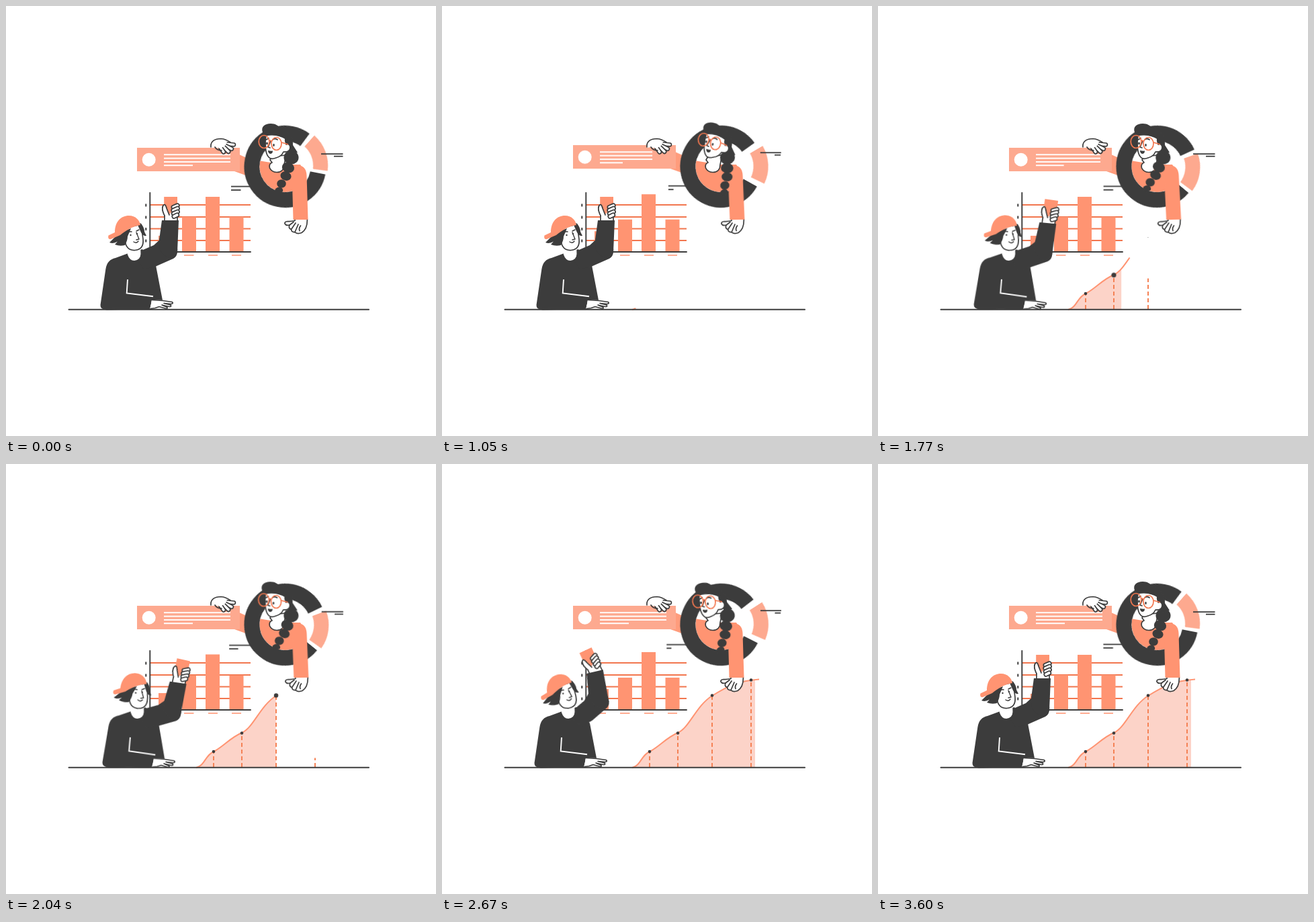
These frames come from a looping animation (640x640 px, 3.63 s). An HTML page without scripts:

```html
<!DOCTYPE html>
<html lang="en">
<head>
<meta charset="utf-8">
<title>Charts</title>
<style>
html, body { margin: 0; width: 100%; height: 100%; overflow: hidden; background: #fff; }
svg { display: block; width: 100vw; height: 100vh; --sine: cubic-bezier(.37,0,.63,1); }

.dark { fill: #3c3c3c; }
.orange { fill: #ff9472; }
.light { fill: #fda98f; }
.white { fill: #fff; }
.ink { fill: none; stroke: #3c3c3c; stroke-width: 1.7; stroke-linecap: round; stroke-linejoin: round; }
.skin { fill: #fff; stroke: #3c3c3c; stroke-width: 1.7; stroke-linejoin: round; stroke-linecap: round; }
.rim { fill: none; stroke: #f2764e; stroke-width: 1.7; }

/* Full-loop motion */
.loop { animation: 3630ms var(--sine) infinite; }
/* Half-second sways, two there-and-backs per loop */
.sway { animation: 907.5ms var(--sine) infinite alternate; }

.bar { transform-origin: 0 366px; animation-name: stretch; }
@keyframes stretch { to { transform: scaleY(var(--s)); } }

.spin { transform-origin: 415.5px 239px; animation: spin 1815ms var(--sine) infinite alternate; }
@keyframes spin { to { transform: rotate(29deg); } }
.slice { animation-name: slice; }
@keyframes slice { from { transform: translate(3.7px,-1.4px); } to { transform: translate(9.8px,-3.7px); } }

.noteR { animation-name: noteR; }
@keyframes noteR { to { transform: translate(5px,-2px); } }
.noteL { animation-name: noteL; animation-delay: -453.75ms; }
@keyframes noteL { from { transform: translate(4px,-1.7px); } to { transform: translate(-4px,1.7px); } }
.trim { animation-name: trim; transform-origin: var(--x) 0; }
@keyframes trim { to { transform: scaleX(var(--s)); } }

.banner { animation-name: banner; }
@keyframes banner { 27% { transform: translateY(-4px); } 48%, 100% { transform: none; } }
.words rect { transform-origin: 235px 0; animation-name: words; }
@keyframes words {
  0%, 53%, 100% { transform: none; }
  13.2% { transform: scaleX(.95); animation-timing-function: linear; }
  30% { transform: scaleX(.78); }
  48% { transform: scaleX(.97); }
}

.herHead { transform-origin: 409px 238px; animation-name: herHead; }
@keyframes herHead {
  0% { transform: none; animation-timing-function: cubic-bezier(.2,.5,.6,1); }
  30% { transform: rotate(8deg); }
  49.5% { transform: rotate(0deg); }
  77% { transform: rotate(-5.5deg); }
  100% { transform: none; }
}
.braid { transform-origin: 425px 224px; animation-name: braid; }
@keyframes braid {
  0%, 100% { transform: none; }
  30% { transform: rotate(-15deg); }
  49.5% { transform: rotate(7deg); }
  77% { transform: rotate(-10deg); }
}
.herArm { transform-origin: 436px 245px; animation-name: herArm; }
@keyframes herArm { 0%, 64%, 100% { transform: none; } 29% { transform: rotate(-.7deg); } 48.8% { transform: rotate(-1.3deg); } }

.body { transform-origin: 190px 452px; animation-name: body; }
@keyframes body {
  0%, 31%, 89%, 100% { transform: none; }
  48.8% { transform: translateX(2px) rotate(1.2deg); animation-timing-function: ease-out; }
  63% { transform: translateX(3.2px) rotate(1.3deg); }
  74% { transform: translateX(-3px); }
}
.hisHead { transform-origin: 190px 362px; animation-name: hisHead; }
@keyframes hisHead {
  0%, 31%, 89%, 100% { transform: none; }
  48.8% { transform: rotate(3.5deg); animation-timing-function: ease-out; }
  63% { transform: rotate(7deg); }
  74% { transform: rotate(-6.5deg); }
}
.upper { transform-origin: 205px 372px; animation-name: upper; }
@keyframes upper {
  0%, 31%, 89%, 100% { transform: none; }
  48.8% { transform: rotate(4deg); animation-timing-function: ease-out; }
  63% { transform: rotate(8deg); }
  74% { transform: rotate(-17deg); }
}
.fore { transform-origin: 243px 364px; animation-name: fore; }
@keyframes fore {
  0%, 31%, 63%, 89%, 100% { transform: none; }
  74% { transform: rotate(4deg); }
}
.grip { transform-origin: 245px 318px; animation-name: grip; }
@keyframes grip {
  0%, 31%, 89%, 100% { transform: none; }
  48.8% { transform: rotate(3deg); animation-timing-function: ease-out; }
  63% { transform: rotate(5deg); }
  74% { transform: rotate(-12deg); }
}
.tap { transform-origin: 217px 447px; animation-name: tap; }
@keyframes tap { 0%, 27%, 100% { transform: none; } 13.2% { transform: rotate(-7deg); } }

/* Area chart reveal, cut back to empty when the loop restarts */
.reveal { animation: 3630ms linear infinite; }
.curve { stroke-dasharray: 100 200; animation-name: curve; }
@keyframes curve { 0%, 28% { stroke-dashoffset: 100; } 68.5%, 100% { stroke-dashoffset: 0; } }
.wipe { transform-origin: 283px 0; animation-name: wipe; }
@keyframes wipe { 0%, 33.9% { transform: scaleX(0); } 68.3%, 100% { transform: none; } }
.rise { transform-origin: 0 452px; }
@keyframes rise1 { 0%, 31% { transform: scaleY(0); } 41%, 100% { transform: none; } }
@keyframes rise2 { 0%, 36% { transform: scaleY(0); } 46%, 100% { transform: none; } }
@keyframes rise3 { 0%, 44% { transform: scaleY(0); } 55%, 100% { transform: none; } }
@keyframes rise4 { 0%, 55% { transform: scaleY(0); } 66%, 100% { transform: none; } }
.dot { transform-box: fill-box; transform-origin: center; }
@keyframes dot1 { 0%, 34% { transform: scale(0); } 40% { transform: scale(1.6); } 46%, 100% { transform: none; } }
@keyframes dot2 { 0%, 42.5% { transform: scale(0); } 48.8% { transform: scale(1.55); } 54%, 100% { transform: none; } }
@keyframes dot3 { 0%, 48% { transform: scale(0); } 54% { transform: scale(1.6); } 60%, 100% { transform: none; } }
@keyframes dot4 { 0%, 62.8% { transform: scale(0); } 68% { transform: scale(1.6); } 73%, 100% { transform: none; } }
</style>
</head>
<body>
<svg viewBox="0 0 640 640">
  <defs>
    <path id="trend" pathLength="100" d="M283 452C296 449 296 434 309 428S334 407 351 400S378 360 402 345S440 323 472 320.5"/>
    <clipPath id="wipe"><rect class="reveal wipe" x="283" y="300" width="183" height="152"/></clipPath>
    <clipPath id="rise">
      <rect class="reveal rise" style="animation-name:rise1" x="306" y="428" width="6" height="24"/>
      <rect class="reveal rise" style="animation-name:rise2" x="348" y="400" width="6" height="52"/>
      <rect class="reveal rise" style="animation-name:rise3" x="399" y="345" width="6" height="107"/>
      <rect class="reveal rise" style="animation-name:rise4" x="457" y="321" width="6" height="131"/>
    </clipPath>
    <clipPath id="hole"><circle cx="415.5" cy="239" r="38"/></clipPath>
  </defs>

  <!-- Area chart -->
  <path d="M283 452C296 449 296 434 309 428S334 407 351 400S378 360 402 345S440 323 472 320.5V452Z" fill="#fcd3c8" clip-path="url(#wipe)"/>
  <path d="M309 451V428M351 451V400M402 451V345M460 451V321" fill="none" stroke="#f58255" stroke-width="2" stroke-dasharray="6 4" clip-path="url(#rise)"/>
  <use href="#trend" class="reveal curve" fill="none" stroke="#ff9472" stroke-width="2"/>
  <g class="dark">
    <circle class="reveal dot" style="animation-name:dot1" cx="309" cy="428" r="2.3"/>
    <circle class="reveal dot" style="animation-name:dot2" cx="351" cy="400.5" r="2.3"/>
    <circle class="reveal dot" style="animation-name:dot3" cx="402" cy="344.5" r="2.3"/>
    <circle class="reveal dot" style="animation-name:dot4" cx="460" cy="321.5" r="2.3"/>
  </g>

  <!-- Bar chart -->
  <path d="M214 296H364M214 314H364M214 331.5H364M214 349H364" fill="none" stroke="#f2764e" stroke-width="1.8"/>
  <path d="M230 371H244M265 371H279.5M301 371H315M336 371H350" fill="none" stroke="#ff9472" stroke-width="1.5"/>
  <g class="orange">
    <rect class="sway bar" style="--s:1.3" x="227" y="342" width="21" height="24"/>
    <rect class="sway bar" style="--s:.923" x="262" y="314" width="21" height="52"/>
    <rect class="sway bar" style="--s:1.049" x="297" y="284" width="21" height="82"/>
    <rect class="sway bar" style="--s:.923" x="332.5" y="314" width="21" height="52"/>
  </g>
  <path class="ink" style="stroke-width:1.9" d="M214.3 278V366H364"/>
  <path class="ink" style="stroke-width:2;stroke-linecap:butt" d="M208.3 294.5v4M208.3 312.5v4M208.3 330v4M208.3 347.5v4"/>

  <!-- Banner -->
  <g class="loop banner">
    <path class="orange" d="M340 221H347L358 226V252.5L340 246Z" opacity=".93"/>
    <rect class="light" x="195" y="211" width="153" height="35"/>
    <circle class="white" cx="212.7" cy="228.7" r="10"/>
    <g class="white words">
      <rect class="loop" x="235" y="220.3" width="99" height="1.9"/>
      <rect class="loop" x="235" y="225.7" width="99" height="1.9"/>
      <rect class="loop" x="235" y="231.1" width="99" height="1.9"/>
      <rect class="loop" x="235" y="236.3" width="43" height="1.9"/>
    </g>
  </g>
  <g class="skin">
    <path d="M305 211C304 201 311 197.500 320 197.500C327 198 331 200 335 203L333 212L322 214L311 210Z" stroke="none"/>
    <rect x="325" y="202.500" width="16.500" height="5" rx="2.500" transform="rotate(6 325 205)"/>
    <rect x="323" y="203.500" width="17" height="5.200" rx="2.600" transform="rotate(27 323 206)"/>
    <rect x="321" y="204" width="17" height="5.200" rx="2.600" transform="rotate(45 321 206.500)"/>
    <rect x="317" y="204.500" width="15" height="5.200" rx="2.600" transform="rotate(56 317 207)"/>
    <path d="M311 210C316 199 325 198 329 203L326 208L319 212Z" stroke="none"/>
    <path d="M305 210C304 201 311 197.500 320 197.500C326 198 330 200 334 203M311 210Q314 215 321 215" fill="none"/>
  </g>

  <!-- Donut -->
  <g class="dark">
    <g class="sway noteL">
      <rect x="335" y="267.700" width="34" height="1.8"/>
      <rect class="sway trim" style="--x:335px;--s:.5" x="335" y="273" width="14.500" height="1.8"/>
    </g>
  </g>
  <g class="spin" fill="none">
    <circle cx="415.5" cy="239" r="49.5" stroke="#3c3c3c" stroke-width="23" pathLength="360" stroke-dasharray="295.5 64.5" transform="rotate(11 415.5 239)"/>
    <g class="sway slice">
      <circle cx="415.5" cy="239" r="49" stroke="#fda98f" stroke-width="22" pathLength="360" stroke-dasharray="56 304" transform="rotate(-48.5 415.5 239)"/>
    </g>
  </g>
  <g class="sway noteR dark">
    <rect class="sway trim" style="--x:469px;--s:.95" x="469" y="219.300" width="32.500" height="1.8"/>
    <rect class="sway trim" style="--x:495px;--s:.65" x="488" y="222.800" width="13.500" height="1.8"/>
  </g>

  <!-- Woman -->
  <path class="orange" clip-path="url(#hole)" d="M370 229L394 233L416 236H438L446 250V290H370Z"/>
  <g class="loop herArm">
    <path class="skin" d="M430 317V319.500Q424 321 419 320.500Q414.500 321 415 324Q417 327.500 422 326Q420 331 424.500 332.500Q425 337 430 336.500Q433 340 440 337.500Q449 332 448.300 317Z"/>
    <path class="ink" d="M422 326L428 321.500M424.500 332.500L431 323M430 336.500L435 325M437 334.500Q435.500 331 438.500 327"/>
    <path class="orange" d="M422 237H436Q447 239 447.500 252L449.500 318H427.500L426 262Z"/>
  </g>
  <path class="skin" d="M393 229L396 233Q391 235 392.500 241Q395 247 403 247.500C410 247.500 414 243 414 236L417 222L396 224Z"/>
  <g class="loop braid">
    <path d="M425 228L419 241L416 253L410 264L406 274" fill="none" stroke="#ff9472" stroke-width="9"/>
    <g class="dark">
      <ellipse cx="424.500" cy="225.500" rx="11" ry="10.300"/>
      <ellipse cx="420" cy="240.500" rx="9.300" ry="7.600" transform="rotate(18 420 240.5)"/>
      <ellipse cx="416.500" cy="253" rx="8.200" ry="6.700" transform="rotate(18 416.5 253)"/>
      <ellipse cx="410" cy="264.500" rx="6.800" ry="6.200"/>
      <path d="M400.500 273Q403 269 408 269.500Q413 271 412 276L406 280Q401 279 400.500 273Z"/>
    </g>
  </g>
  <g class="loop herHead">
    <path class="dark" d="M382 188C379 180 385 175 394 175C401 175 405 178 407 181C421 184 428 196 427 207L434 218L423 222L415 203L386 194Z"/>
    <path class="skin" d="M387 192C385 206 386 220 391 225Q394 229 402 226Q410 224 413 217Q423 218 423 210Q422 204 417 206L417 198Q402 189 387 192Z"/>
    <path class="dark" d="M383 189Q398 186 419 194L418 207Q414 203 415 197Q401 190 385 194Z"/>
    <path class="ink" d="M387 199L391 197M397 199Q400 196 404 199M394 201L390 210L393 211"/>
    <ellipse class="dark" cx="388.500" cy="204.500" rx="1.300" ry="2"/>
    <ellipse class="dark" cx="398.500" cy="207" rx="1.300" ry="2"/>
    <path class="dark" d="M390 215Q394 216 397 215.500Q397 220 393 220Q390 219 390 215Z"/>
    <g class="rim">
      <ellipse cx="384" cy="202" rx="7.800" ry="9.500"/>
      <ellipse cx="402.500" cy="205" rx="7.500" ry="9.500"/>
      <path d="M391.500 201Q394 199 395.500 202M410 203L420 206"/>
    </g>
  </g>

  <!-- Man -->
  <g class="loop body">
    <path class="dark" d="M140.500 445L148.300 392C150 381 155 377 163 375L182 368L203 362L223 386L233 438L217 440L214 451L150 452.500Q140 452 140.500 445Z"/>
    <path d="M181 407L179.700 427.500L219 432.200" fill="none" stroke="#fff" stroke-width="1.9"/>
    <g class="loop tap">
      <path class="white" d="M217 437L235 438L243 448L229 450.500L214.500 451Z"/>
      <path class="skin" d="M217 437.500L233 438.500L247 440.500Q250 442.500 246 443.500L235 442.500L245 445Q247 447.500 243 447.500L232 445L240 448.500Q241 451 237 450L228 447.500L222 449.500L215 450.500"/>
    </g>
    <g class="loop upper">
      <path class="dark" d="M190 369L220 356L232 345L254 355Q258 371 249 376L223 387.500L205 392Z"/>
      <g class="loop fore">
        <g class="loop grip">
          <path class="skin" d="M236 322V311Q231 302 234 297Q237 294 239 299L241 306L251 296L255 312V322Z"/>
          <rect class="orange" x="235.200" y="284" width="19.800" height="15"/>
          <path class="orange" d="M239 298H249L247 306L242 311Z"/>
          <path class="skin" d="M236 312Q231 302 234 297Q237 293 239 301L243 311"/>
          <g class="skin">
            <rect x="246" y="295.500" width="12" height="5.500" rx="2.700" transform="rotate(-24 252 298)"/>
            <rect x="246" y="300" width="12.500" height="5.500" rx="2.700" transform="rotate(-24 252 303)"/>
            <rect x="246.500" y="305" width="12" height="5.500" rx="2.700" transform="rotate(-24 252 308)"/>
            <rect x="247" y="309.500" width="10.500" height="5.500" rx="2.700" transform="rotate(-24 252 312)"/>
          </g>
        </g>
        <path class="dark" d="M232 319H257L255 366Q253 376 245 375Q226 371 228 348Z"/>
      </g>
    </g>
    <path class="white" d="M178 352L181 370Q184 379 191 379Q200 378 200.500 369L200 354Z"/>
    <g class="loop hisHead">
      <path class="skin" d="M176 340C176 360 184 364 192 363.500C201 363 205 357 204 347L201 325L180 330Z"/>
      <path class="dark" d="M165 341L154 352Q160 354.500 166 350.500L162 355Q169 358 177 356Q181 349 181 343L186 331L172 336Z"/>
      <path class="dark" d="M196 326L200 323Q206 329 206 336L209 342Q204 343 201 337Z"/>
      <path class="orange" d="M162 337C162 321 171 312 183 312C193 312 199 319 200 326C188 328 177 335 170 341L156 347Q151 347.500 152.500 341.500Z"/>
      <path class="ink" style="stroke-width:1.4" d="M181 338Q183 335 187 336M194 335L198 333M194 337L198 347L194 348M190 351Q194 354 197 350"/>
      <circle class="dark" cx="185.500" cy="341" r="1.200"/>
      <circle class="dark" cx="195" cy="339" r="1.200"/>
    </g>
  </g>

  <path class="ink" style="stroke-width:2" d="M93.500 451.700H540"/>
</svg>
</body>
</html>
```
